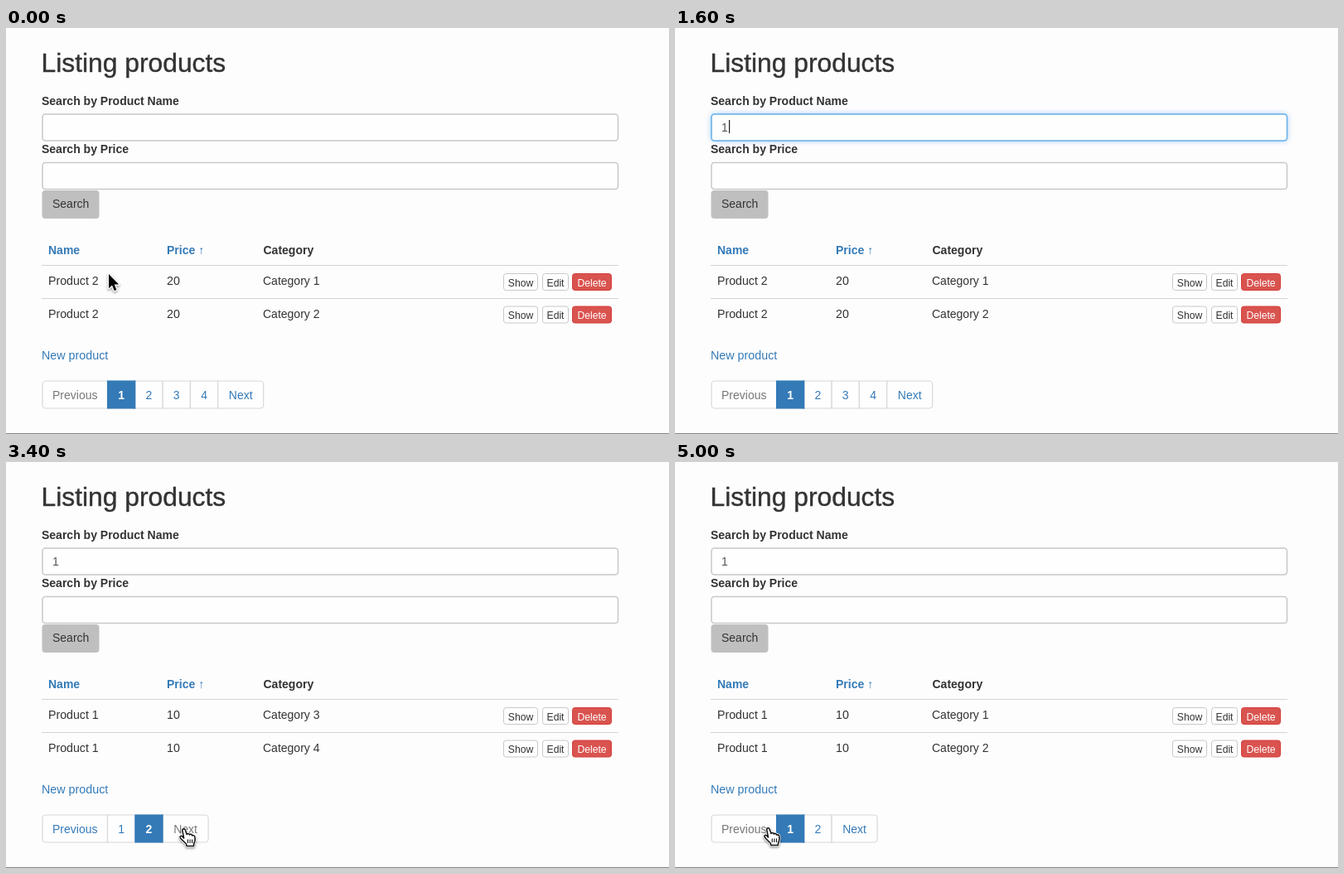
Write an HTML page with a canvas that moves like this. It is 800x490 px and loops after 5.1 s.

```html
<!DOCTYPE html>
<html lang="en">
<head>
<meta charset="utf-8">
<title>Listing products</title>
<style>
html, body { margin: 0; width: 800px; height: 490px; overflow: hidden; }
canvas { display: block; }
</style>
</head>
<body>
<canvas id="stage" width="800" height="490"></canvas>
<script>
const ctx = document.getElementById('stage').getContext('2d');
const LOOP = 5100, STEP = 100;
const INK = '#333', LINK = '#337ab7', LINK_HOVER = '#23527c', MUTED = '#777', BORDER = '#c8c8cb';

// Moments at which the page reacts, in ms
const FOCUS = 500, TYPE = 1300, RESULTS = 1700, NEXT = 3200, PREVIOUS = 4500;

// Pointer path: time, x, y
const route = [
  [0, 124, 297], [100, 124, 297], [500, 133, 126], [1800, 133, 126], [2200, 230, 276],
  [2800, 226, 443], [3300, 226, 443], [3800, 112, 442], [LOOP, 112, 442]
];

const arrow = new Path2D('M0 0V17.2L4 13.5L6.7 20L9.4 18.9L6.7 12.6H12.2Z');
const hand = new Path2D('M.5 11L-1.2 2.2C-1.7 -.4 1.4 -1.2 2.2 1.2L4 6.5C4.8 5 7 5.3 7.3 7' +
  'C8.3 5.9 10.3 6.3 10.5 8C11.8 7.3 13.6 8 13.8 9.8C14.3 13 14 15.5 12.6 17.6L12.4 20.5H3.8' +
  'L3.4 18.3C1 15.8 -2 12.8 -3.8 10.8C-5 9 -3 7.6 -1.3 9Z');
const creases = new Path2D('M5.3 12.5V17M7.9 12.5V17M10.5 12.5V17');
const beam = new Path2D('M-4 -10Q-1 -10 0 -8Q1 -10 4 -10M0 -8V8M-4 10Q-1 10 0 8Q1 10 4 10M-2.5 3.5H2.5');

function pointerAt(t) {
  const i = route.findIndex(p => p[0] > t);
  const [t0, x0, y0] = route[i - 1], [t1, x1, y1] = route[i];
  const u = (t - t0) / (t1 - t0), e = u * u * (3 - 2 * u);
  return { x: x0 + (x1 - x0) * e, y: y0 + (y1 - y0) * e };
}

const inside = (p, x, y, w, h) => p.x >= x && p.x < x + w && p.y >= y && p.y < y + h;

function text(str, x, y, { size = 14.2, bold = false, color = INK, align = 'left' } = {}) {
  ctx.font = `${bold ? 'bold ' : ''}${size}px "Liberation Sans", Arial, sans-serif`;
  ctx.textAlign = align;
  ctx.fillStyle = color;
  ctx.fillText(str, x, y);
}

function box(x, y, w, h, radius, fill, stroke, width = 1) {
  ctx.beginPath();
  ctx.roundRect(x, y, w, h, radius);
  ctx.fillStyle = fill;
  ctx.fill();
  if (!stroke) return;
  ctx.shadowColor = 'transparent';
  ctx.strokeStyle = stroke;
  ctx.lineWidth = width;
  ctx.stroke();
}

function rule(y, x = 43, w = 696, color = '#d3d3d5') {
  ctx.fillStyle = color;
  ctx.fillRect(x, y, w, 1);
}

function field(y, focused) {
  ctx.save();
  if (focused) {
    ctx.shadowColor = 'rgba(102,175,233,.7)';
    ctx.shadowBlur = 7;
  }
  box(44, y, 694.5, 32, 3.5, '#fefefe', focused ? '#66afe9' : BORDER, 1.5);
  ctx.restore();
}

function smallButton(label, x, y, w, danger) {
  box(x + .5, y + .5, w - 1, 20, 3, danger ? '#d9534f' : '#fefefe', danger ? '#d43f3a' : BORDER);
  text(label, x + w / 2, y + 15.5, { size: 12.2, color: danger ? '#fff' : INK, align: 'center' });
}

function pagination(count, page, pointer) {
  const labels = ['Previous', ...Array.from({ length: count }, (_, i) => `${i + 1}`), 'Next'];
  let x = 44;
  labels.forEach((label, i) => {
    const first = i === 0, last = i === count + 1;
    const w = first ? 78.5 : last ? 55 : 33.3;
    const active = i === page;
    const disabled = first && page === 1 || last && page === count;
    const hover = !active && !disabled && inside(pointer, x, 426, w, 33);
    const l = first ? 4 : 0, r = last ? 4 : 0;
    box(x, 426, w, 33, [l, r, r, l], hover ? '#eee' : '#fefefe', '#d8d8da', 1.2);
    if (active) box(x - .5, 425.5, w + 1, 34, 0, LINK);
    text(label, x + w / 2, 448, {
      size: 14, bold: active, align: 'center',
      color: active ? '#fff' : disabled ? MUTED : hover ? LINK_HOVER : LINK
    });
    x += w;
  });
  // Repaint the active cell over its neighbour's border
  const ax = 122.5 + (page - 1) * 33.3;
  ctx.fillStyle = LINK;
  ctx.fillRect(ax + 32, 425.5, 1.8, 34);
}

function drawPointer(p, t) {
  if (t >= TYPE && t <= 1800) return;
  const overField = inside(p, 44, 104, 695, 32) || inside(p, 44, 162, 695, 33);
  ctx.save();
  ctx.translate(p.x, p.y);
  ctx.lineJoin = 'round';
  if (overField) {
    ctx.strokeStyle = '#fff';
    ctx.lineWidth = 3.2;
    ctx.stroke(beam);
    ctx.strokeStyle = '#111';
    ctx.lineWidth = 1.7;
    ctx.stroke(beam);
  } else {
    const linked = p.y > 426;
    const shape = linked ? hand : arrow;
    ctx.save();
    ctx.shadowColor = 'rgba(0,0,0,.4)';
    ctx.shadowBlur = 3;
    ctx.shadowOffsetY = 1.5;
    ctx.strokeStyle = '#fff';
    ctx.lineWidth = linked ? 3 : 2.6;
    ctx.stroke(shape);
    ctx.restore();
    ctx.fillStyle = linked ? '#fff' : '#000';
    ctx.fill(shape);
    if (linked) {
      ctx.strokeStyle = '#111';
      ctx.lineWidth = 1.5;
      ctx.stroke(hand);
      ctx.lineWidth = 1.1;
      ctx.stroke(creases);
    }
  }
  ctx.restore();
}

function draw(t) {
  const pointer = pointerAt(t);
  const focused = t >= FOCUS && t < RESULTS;
  const filtered = t >= RESULTS;
  const page = t >= NEXT && t < PREVIOUS ? 2 : 1;

  ctx.fillStyle = '#fefdfe';
  ctx.fillRect(0, 0, 800, 490);
  rule(489, 0, 800, '#858585');

  text('Listing products', 42.5, 53, { size: 31.8 });
  ctx.strokeStyle = INK;
  ctx.lineWidth = .4;
  ctx.strokeText('Listing products', 42.5, 53);

  text('Search by Product Name', 43, 93, { size: 14, bold: true });
  text('Search by Price', 43, 151, { size: 14, bold: true });
  field(104, focused);
  field(162.5, false);
  const typed = t >= TYPE;
  if (typed) text('1', 56, 125, { size: 14, color: '#555' });
  const caretOn = typed || t < FOCUS + 500;
  if (focused && caretOn) {
    ctx.fillStyle = '#222';
    ctx.fillRect(typed ? 65 : 57, 111, 1.2, 16);
  }
  box(43.5, 196, 69, 34, 4, '#bfbfbf');
  text('Search', 56, 217, { size: 14 });

  const sortHover = inside(pointer, 194, 258, 45, 20);
  const sortColor = sortHover ? LINK_HOVER : LINK;
  text('Name', 51, 273, { size: 14, bold: true, color: LINK });
  text('Price ↑', 194, 273, { size: 14, bold: true, color: sortColor });
  if (sortHover) rule(274.5, 194, 45, sortColor);
  text('Category', 310.5, 273, { size: 14, bold: true });
  rule(286);
  rule(326);

  [0, 1].forEach(row => {
    const y = 310 + row * 40;
    text(filtered ? 'Product 1' : 'Product 2', 51, y);
    text(filtered ? '10' : '20', 194, y);
    text(`Category ${page * 2 - 1 + row}`, 310, y, { size: 14 });
    const top = 296 + row * 39.5;
    smallButton('Show', 600, top, 42);
    smallButton('Edit', 647, top, 32);
    smallButton('Delete', 683, top, 48, true);
  });

  text('New product', 43, 400, { size: 14.3, color: LINK });
  pagination(filtered ? 2 : 4, page, pointer);
  drawPointer(pointer, t);
}

function tick() {
  draw(Math.floor(performance.now() % LOOP / STEP) * STEP);
  requestAnimationFrame(tick);
}
tick();
</script>
</body>
</html>
```
